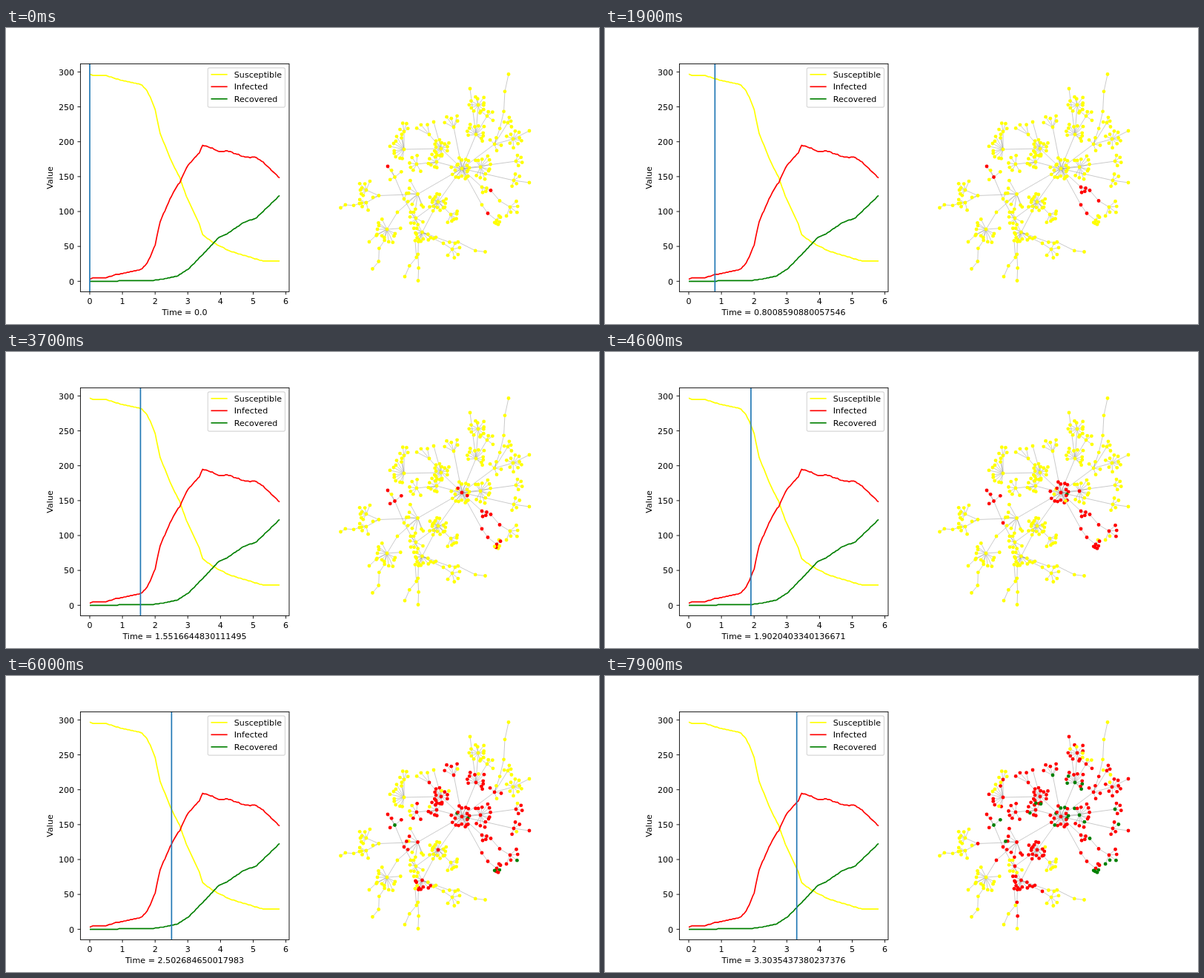
Write an HTML page that moves like this. It is 800 by 400 pixels and loops after 8 s.

```html
<!DOCTYPE html>
<html lang="en">
<head>
<meta charset="utf-8">
<title>Epidemic on a network</title>
<style>
  html, body { margin: 0; width: 100%; height: 100%; overflow: hidden; background: #fff; }
  svg { display: block; width: 800px; height: 400px; }
  text { font: 11.11px "DejaVu Sans", sans-serif; fill: #000; }
  .mid { text-anchor: middle; }
  .end { text-anchor: end; }
  .curve { fill: none; stroke-width: 1.67; stroke-linejoin: round; }
  .axis { fill: none; stroke: #000; stroke-width: .9; }
  .edge { fill: none; stroke: #666; stroke-width: .35; }
</style>
</head>
<body>
<svg id="stage" viewBox="0 0 800 400"></svg>
<script>
const LOOP = 8000, FRAME = 100, FRAMES_PER_STEP = 1.2;
const DT = 0.05005369300035966, STEPS = 116, PEOPLE = 300;
const YELLOW = '#ffff00', RED = '#ff0000', GREEN = '#008000';

const stage = document.getElementById('stage');
const toX = time => 113 + time * 44.1;
const toY = value => 342.3 - value * 0.943;

function add(tag, attrs, text) {
  const el = document.createElementNS('http://www.w3.org/2000/svg', tag);
  for (const key in attrs) el.setAttribute(key, attrs[key]);
  if (text !== undefined) el.textContent = text;
  return stage.appendChild(el);
}

let seed = 7;
function rand() {
  seed = (seed * 1664525 + 1013904223) % 4294967296;
  return seed / 4294967296;
}

// ---- Epidemic counts ----
// Whole-number counts along straight runs between [time, value] points.
function series(points) {
  return Array.from({ length: STEPS + 1 }, (_, step) => {
    const t = step * DT;
    const i = Math.max(1, points.findIndex(p => p[0] >= t));
    const [[t0, v0], [t1, v1]] = [points[i - 1], points[i]];
    return Math.round(v0 + (v1 - v0) * (t - t0) / (t1 - t0));
  });
}

const susceptible = series([[0, 297], [.1, 295], [.5, 295], [.95, 288], [1.58, 282], [1.75, 273],
  [1.88, 261], [2, 246], [2.15, 212], [2.5, 172], [2.77, 147], [2.95, 122], [3.36, 81], [3.45, 67],
  [3.75, 56], [4.3, 43], [5.3, 29], [6, 29]]);
const recovered = series([[0, 0], [.85, 0], [.9, 1], [1.9, 1], [2.35, 4], [2.7, 8], [3, 17],
  [3.45, 38], [3.95, 63], [4.2, 68], [4.7, 84], [5.1, 91], [5.81, 123], [6, 130]]);
const infected = susceptible.map((s, i) => PEOPLE - s - recovered[i]);

// ---- Chart ----
const groups = [['Susceptible', YELLOW, susceptible], ['Infected', RED, infected],
  ['Recovered', GREEN, recovered]];

for (const [, stroke, values] of groups) {
  const points = values.map((v, i) => toX(i * DT) + ',' + toY(v)).join(' ');
  add('polyline', { class: 'curve', stroke, points });
}

const cursor = add('line', { y1: 48, y2: 356, stroke: '#1f77b4', 'stroke-width': 1.67 });

add('rect', { class: 'axis', x: 100.4, y: 48.4, width: 281.6, height: 308 });
for (let i = 0; i <= 6; i++) {
  const x = toX(i), y = toY(i * 50);
  add('path', { class: 'axis', d: `M${x} 356.4v3.9M100.4 ${y}h-3.9` });
  add('text', { class: 'mid', x, y: 373 }, i);
  add('text', { class: 'end', x: 92.2, y: y + 4.3 }, i * 50);
}
add('text', { class: 'mid', transform: 'translate(63 202.5) rotate(-90)' }, 'Value');
const clock = add('text', { class: 'mid', x: 241, y: 388 });

add('rect', { x: 272.3, y: 53.9, width: 104.2, height: 53.2, rx: 2.2, fill: '#fff',
  'fill-opacity': .8, stroke: '#ccc', 'stroke-opacity': .8, 'stroke-width': 1.1 });
groups.forEach(([name, stroke], i) => {
  const y = 62.8 + i * 16.5;
  add('line', { x1: 276.5, x2: 298.7, y1: y, y2: y, stroke, 'stroke-width': 1.67 });
  add('text', { x: 307.8, y: y + 3.8 }, name);
});

// ---- Network ----
const nodes = [], hubs = [];
let edges = '';

function grow(parent, x, y) {
  const node = { x, y, links: [], sick: Infinity };
  nodes.push(node);
  if (parent) {
    const length = Math.hypot(x - parent.x, y - parent.y);
    const lag = length * .8 + 40 * rand() ** 2;
    parent.links.push([node, lag]);
    node.links.push([parent, lag]);
    edges += `M${parent.x} ${parent.y}L${x} ${y}`;
  }
  return node;
}

function leaf(hub, angle) {
  const r = hub.reach * (.5 + .5 * rand());
  grow(hub, hub.x + r * Math.cos(angle), hub.y + r * Math.sin(angle));
}

// A node with leaves fanned out on the side away from its parent.
function hub(parent, x, y, count = 0, reach = 12, spread = 4.6) {
  const node = Object.assign(grow(parent, x, y), { reach });
  node.out = parent ? Math.atan2(y - parent.y, x - parent.x) : 0;
  for (let i = 0; i < count; i++) {
    leaf(node, node.out + spread * ((i + .2 + .6 * rand()) / count - .5));
  }
  if (count > 5) hubs.push(node);
  return node;
}

// A slightly uneven row of nodes ending at a point.
function chain(parent, x, y, count) {
  let last = parent;
  for (let i = 1; i <= count; i++) {
    const f = i / count, sway = i < count ? 8 * (rand() - .5) : 0;
    last = grow(last, parent.x + (x - parent.x) * f + sway, parent.y + (y - parent.y) * f + sway);
  }
  return last;
}

const root = hub(null, 615, 190, 18, 15, 6.28);

// East
hub(root, 640, 188, 12, 19);
const bend = hub(root, 642, 215, 3, 11, 2);
const seedA = hub(bend, 654, 219.5);
hub(hub(seedA, 666, 233.5), 680, 242, 5, 13, 3.6);
const seedB = hub(hub(root, 642, 239), 650, 250.5);
hub(seedB, 662, 260, 6, 7);
hub(root, 688, 180, 4, 11, 3);
chain(hub(root, 685, 206, 4, 10), 706, 209, 1);

// North
const north = hub(root, 634, 144, 11, 16);
hub(north, 637, 104, 11, 14, 6);
chain(north, 626, 82, 1);
hub(north, 649, 119, 4, 12);
const fork = hub(root, 659, 157, 4, 13);
chain(fork, 678, 62.5, 4);
const crown = hub(fork, 684, 150, 9, 13, 5.4);
chain(crown, 706, 139, 1);
hub(fork, 677, 128, 4, 8);
const knot = hub(root, 587, 163, 14, 14, 5.6);
hub(root, 604, 134, 5, 17, 2);
chain(knot, 577, 127, 1);
hub(knot, 571, 144, 3, 22, 1.2);

// West
hub(hub(root, 581, 181, 8, 13), 554, 184, 6, 13);
const loft = hub(knot, 537, 164, 10, 24, 3);
hub(loft, 537, 140, 4, 12, 2.5);
const west = hub(root, 555.5, 224.5, 7, 21, 3.6);
const gate = hub(west, 503, 226.5, 1);
hub(gate, 486, 219, 7, 13, 3.4);
chain(hub(gate, 486, 236, 4, 12, 3), 451.5, 243, 4);

// South
const south = hub(root, 583, 235, 16, 14, 5.6);
hub(south, 600, 252, 6, 14, 3);
hub(south, 553, 257, 7, 11);
const base = hub(south, 561.5, 276, 11, 15, 4);
chain(base, 556, 341.5, 4);
chain(base, 538, 336, 4);
hub(chain(base, 590, 291, 2), 602, 299, 5, 12, 4);
chain(base, 646.5, 302.5, 5);
const nest = hub(hub(west, 528, 249), 514, 272, 12, 21, 4.6);
chain(nest, 490, 289, 2);
chain(nest, 494.5, 325.5, 4);
const stem = hub(hub(base, 537, 231, 1), 524.5, 201.5, 3, 14);
const seedC = hub(stem, 515, 187);

while (nodes.length < PEOPLE) {
  const host = hubs[Math.floor(rand() * hubs.length)];
  leaf(host, host.out + 4 * (rand() - .5));
}

// ---- Spread: along the links from three seeds, nearest first ----
function infect(node, time) {
  if (time >= node.sick) return;
  node.sick = time;
  for (const [next, lag] of node.links) infect(next, time + lag);
}
[seedA, seedB, seedC].forEach(node => infect(node, 0));

[...nodes].sort((a, b) => a.sick - b.sick).forEach((n, i) => {
  n.sickRank = i;
  n.healScore = i + 150 * rand();
});
[...nodes].sort((a, b) => a.healScore - b.healScore).forEach((n, i) => { n.healRank = i; });

add('path', { class: 'edge', d: edges });
for (const n of nodes) n.dot = add('circle', { cx: n.x, cy: n.y, r: 2.4 });

// ---- Playback ----
let shown = -1;

function colorAt(node, step) {
  if (node.sickRank >= PEOPLE - susceptible[step]) return YELLOW;
  return node.healRank < recovered[step] ? GREEN : RED;
}

function draw(step) {
  if (step === shown) return;
  shown = step;
  const time = step * DT, x = toX(time);
  cursor.setAttribute('x1', x);
  cursor.setAttribute('x2', x);
  clock.textContent = 'Time = ' + (step ? time : '0.0');
  for (const n of nodes) n.dot.setAttribute('fill', colorAt(n, step));
}

function tick() {
  const frame = Math.floor(performance.now() % LOOP / FRAME);
  draw(Math.floor((frame + .5) / FRAMES_PER_STEP));
  requestAnimationFrame(tick);
}
tick();
</script>
</body>
</html>
```
